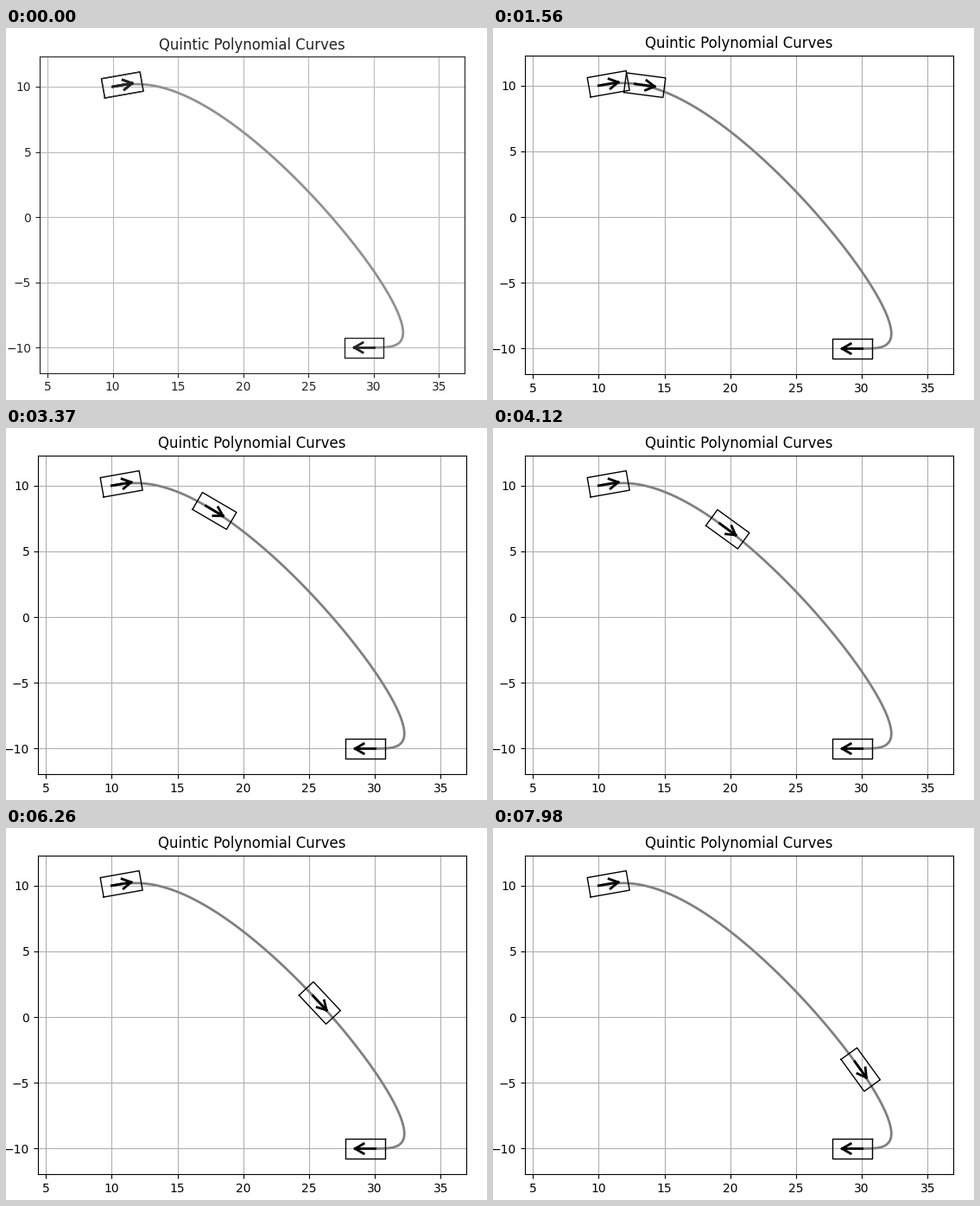
Write a matplotlib script that moves like this. It is 557 by 431 pixels and loops after 8000 ms.

```python
import numpy as np
import matplotlib.pyplot as plt
from matplotlib.animation import FuncAnimation
from matplotlib.patches import Rectangle

W, H, DPI = 557, 431, 100
INTERVAL, LOOP = 20, 8000
DURATION, DT = 20.0, 0.1
CAR_LENGTH, CAR_WIDTH = 3.0, 1.5

# Axes edges in stage pixels (y down), and the data-to-pixel mapping
LEFT, RIGHT, TOP, BOTTOM = 37.0, 533.0, 31.6, 401.2
X10, Y10, UNIT = 122.4, 66.8, 15.235

# Bursts of playback: start ms, end ms, first step, last step
BURSTS = [
    (50, 820, 1, 13), (870, 1660, 14, 26), (1760, 2550, 27, 39),
    (2580, 3370, 40, 52), (3520, 4270, 55, 65), (4350, 5140, 66, 78),
    (5190, 5370, 79, 82), (5520, 5700, 84, 87), (5850, 6570, 89, 100),
    (6670, 7470, 101, 113), (7550, 7980, 114, 121),
]


def quintic(p0, v0, a0, p1, v1, a1, T):
    """Polynomial meeting position, speed and acceleration at both ends."""
    A = [[T**3, T**4, T**5],
         [3 * T**2, 4 * T**3, 5 * T**4],
         [6 * T, 12 * T**2, 20 * T**3]]
    b = [p1 - p0 - v0 * T - a0 * T**2 / 2, v1 - v0 - a0 * T, a1 - a0]
    return np.polynomial.Polynomial([p0, v0, a0 / 2, *np.linalg.solve(A, b)])


START = (10.0, 10.0, np.deg2rad(10))
GOAL = (30.0, -10.0, np.pi)
SPEED, ACCEL = 1.0, 0.1


def axis_curve(k, trig):
    s, g = trig(START[2]), trig(GOAL[2])
    return quintic(START[k], SPEED * s, ACCEL * s,
                   GOAL[k], SPEED * g, ACCEL * g, DURATION)


curve_x, curve_y = axis_curve(0, np.cos), axis_curve(1, np.sin)


def pose(step):
    t = step * DT
    yaw = np.arctan2(curve_y.deriv()(t), curve_x.deriv()(t))
    return curve_x(t), curve_y(t), yaw


def car_shapes(x, y, yaw):
    """Outline, arrow shaft and the two arrow barbs as 2 x n arrays."""
    c, s = np.cos(yaw), np.sin(yaw)
    turn = np.array([[c, -s], [s, c]])
    back, front, side = -CAR_LENGTH / 4, CAR_LENGTH * 3 / 4, CAR_WIDTH / 2
    tip = CAR_LENGTH / 2
    bx = tip - tip / 2 * np.cos(np.pi / 6)
    by = tip / 2 * np.sin(np.pi / 6)
    local = [
        [[back, back, front, front, back], [-side, side, side, -side, -side]],
        [[0, tip], [0, 0]],
        [[tip, bx], [0, by]],
        [[tip, bx], [0, -by]],
    ]
    return [turn @ np.array(p) + [[x], [y]] for p in local]


class Car:
    def __init__(self, ax):
        self.lines = [ax.plot([], [], color="black", lw=lw)[0]
                      for lw in (1, 2, 2, 2)]

    def place(self, x, y, yaw):
        for line, pts in zip(self.lines, car_shapes(x, y, yaw)):
            line.set_data(*pts)


plt.rcParams["font.family"] = "DejaVu Sans"
# The small surplus keeps the pixel size from rounding down
fig = plt.figure(figsize=((W + 0.01) / DPI, (H + 0.01) / DPI), dpi=DPI,
                 facecolor="white")
ax = fig.add_axes([0, 0, 1, 1])
ax.grid(True)
title = ax.set_title("Quintic Polynomial Curves")

ts = np.arange(0, DURATION + DT / 2, DT)
ax.plot(curve_x(ts), curve_y(ts), color="gray", lw=2)
start_car, goal_car, mover = Car(ax), Car(ax), Car(ax)
start_car.place(*START)
goal_car.place(*GOAL)

ax.set_xlim(10 + (LEFT - X10) / UNIT, 10 + (RIGHT - X10) / UNIT)
ax.set_ylim(10 - (BOTTOM - Y10) / UNIT, 10 - (TOP - Y10) / UNIT)
ax.set_xticks(range(5, 36, 5))
ax.set_yticks(range(-10, 11, 5))

veil = Rectangle((0, 0), 1, 1, transform=fig.transFigure, fc="white",
                 ec="none", alpha=0.14, zorder=100)
fig.add_artist(veil)


def zoom(k):
    """Scale the whole plot about the window centre."""
    cx, cy = 277, 214
    x0, x1 = cx + k * (LEFT - cx), cx + k * (RIGHT - cx)
    y0, y1 = cy + k * (TOP - cy), cy + k * (BOTTOM - cy)
    ax.set_position([x0 / W, 1 - y1 / H, (x1 - x0) / W, (y1 - y0) / H])
    title.set_fontsize(12 * k)
    ax.tick_params(labelsize=10 * k)


def step_at(ms):
    step = 0
    for t0, t1, i0, i1 in BURSTS:
        if ms >= t0:
            part = (ms - t0) / (t1 - t0) * (i1 - i0)
            step = min(i1, int(i0 + part + 0.2))
    return step


def update(n):
    ms = n * INTERVAL + INTERVAL / 2
    opening = ms < BURSTS[0][0]
    if opening != veil.get_visible() or n == 0:
        zoom(0.992 if opening else 1)
        veil.set_visible(opening)
    mover.place(*pose(step_at(ms)))
    return mover.lines


anim = FuncAnimation(fig, update, frames=LOOP // INTERVAL, interval=INTERVAL,
                     repeat=True, repeat_delay=0, blit=False)
plt.show()
```
